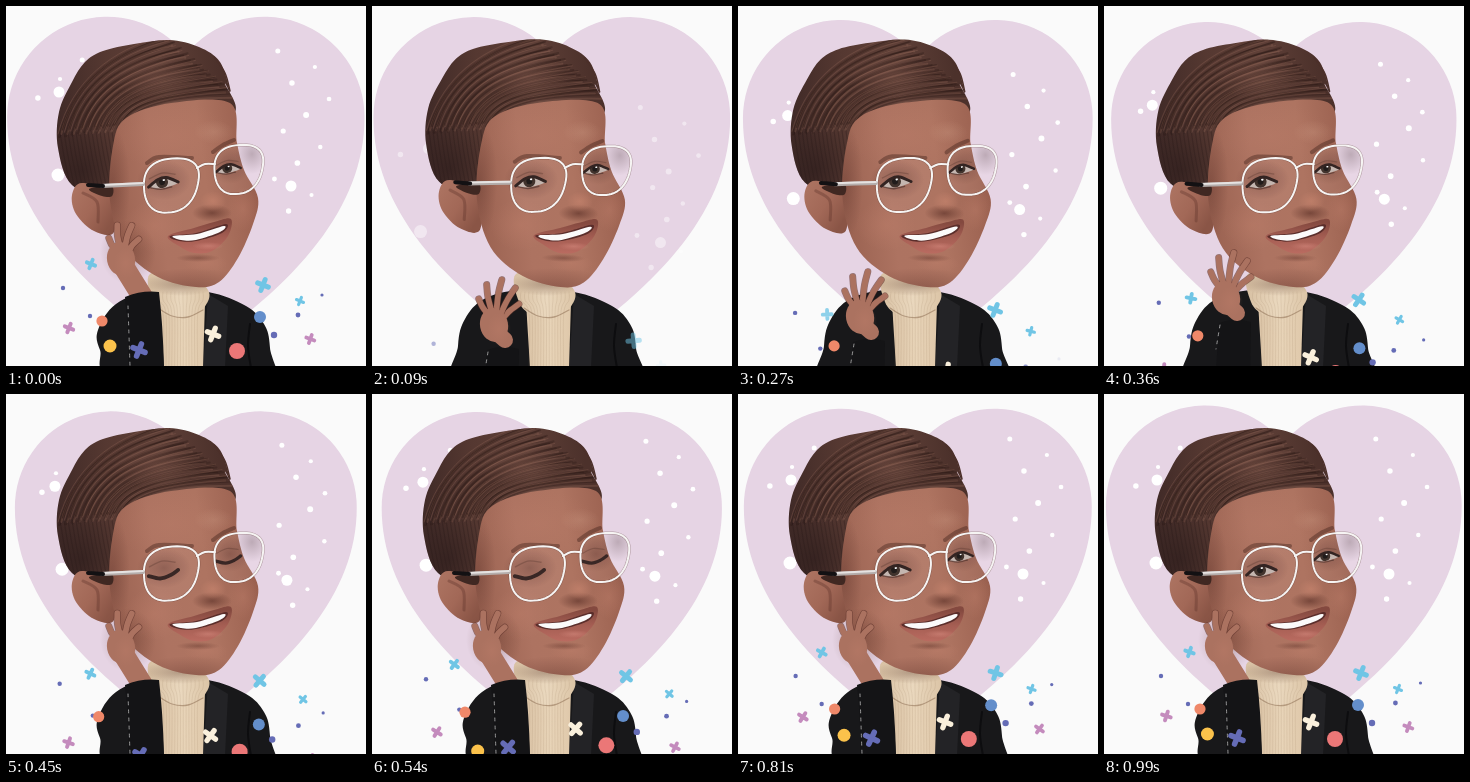
These frames come from a looping animation (360x360 px, 1080 ms). An HTML page with a canvas:

```html
<!DOCTYPE html>
<html lang="en">
<head>
<meta charset="utf-8">
<title>Smiling avatar with heart</title>
<style>
html, body { margin: 0; width: 100%; height: 100%; overflow: hidden; background: #fafafa; }
canvas { display: block; width: 100vw; height: 100vh; }
</style>
</head>
<body>
<canvas id="stage"></canvas>
<script>
const canvas = document.getElementById('stage');
const ctx = canvas.getContext('2d');
const SIZE = 360, STEP = 90, STEPS = 12, TAU = Math.PI * 2;
const ratio = window.devicePixelRatio || 1;
canvas.width = canvas.height = SIZE * ratio;

// Smooth path through "x y x y ..." points.
function curve(text, closed = true) {
  const n = text.split(' ').map(Number), p = [];
  for (let i = 0; i < n.length; i += 2) p.push([n[i], n[i + 1]]);
  const at = i => closed ? p[(i + p.length) % p.length] : p[Math.max(0, Math.min(p.length - 1, i))];
  const path = new Path2D();
  path.moveTo(...p[0]);
  for (let i = 0; i < p.length - !closed; i++) {
    const [a, b, c, d] = [at(i - 1), at(i), at(i + 1), at(i + 2)];
    path.bezierCurveTo(b[0] + (c[0] - a[0]) / 6, b[1] + (c[1] - a[1]) / 6,
      c[0] - (d[0] - b[0]) / 6, c[1] - (d[1] - b[1]) / 6, c[0], c[1]);
  }
  if (closed) path.closePath();
  return path;
}
const line = text => curve(text, false);

function oval(x, y, rx, ry, turn = 0) {
  const path = new Path2D();
  path.ellipse(x, y, rx, ry, turn, 0, TAU);
  return path;
}
function fill(path, color) { ctx.fillStyle = color; ctx.fill(path); }
function stroke(path, color, width) {
  ctx.strokeStyle = color; ctx.lineWidth = width; ctx.stroke(path);
}
const disc = (x, y, r, color) => fill(oval(x, y, r, r), color);

function linear(x0, y0, x1, y1, ...colors) {
  const g = ctx.createLinearGradient(x0, y0, x1, y1);
  colors.forEach((c, i) => g.addColorStop(i / (colors.length - 1), c));
  return g;
}
// Soft elliptical tint.
function glow(x, y, rx, ry, rgb, alpha) {
  ctx.save();
  ctx.translate(x, y); ctx.scale(rx, ry);
  const g = ctx.createRadialGradient(0, 0, 0, 0, 0, 1);
  g.addColorStop(0, `rgba(${rgb},${alpha})`);
  g.addColorStop(1, `rgba(${rgb},0)`);
  disc(0, 0, 1, g);
  ctx.restore();
}
function clipped(path, draw) {
  ctx.save(); ctx.clip(path); draw(); ctx.restore();
}

// Squarish lens that narrows downwards.
function lens(cx, cy, rx, ry, lean) {
  const path = new Path2D(), soft = v => Math.sign(v) * Math.abs(v) ** .82;
  for (let a = 0; a < TAU; a += .1) {
    const x = soft(Math.cos(a)), y = soft(Math.sin(a));
    path.lineTo(cx + rx * x * (1 - .12 * y) - lean * y, cy + ry * y - lean * x);
  }
  path.closePath();
  return path;
}

const heart = new Path2D('M179.5 49A100 100 0 0 0 1 112C1 200 67 278 179.5 352C292 278 358 200 358 112A100 100 0 0 0 179.5 49Z');
const hair = curve('104 191 66 179 52 142 53 106 66 76 79 56 97 45 128 38 163 34 193 41 214 56 224 86 219 78 227 108 160 114 108 160');
const face = curve('224 97 231 137 238 164 252 192 247 218 232 252 213 276 190 281 152 271 119 243 104 195 107 140 120 112 165 97');
const lenses = [lens(165, 179.5, 27, 27, 2), lens(232.5, 163.5, 24, 24.5, 1.5)];

const WHITE = '#fff', BLUE = '#70c5e5', INDIGO = '#656cb6', PINK = '#c48bbd';
const SKIN = '#ab7260', CREASE = 'rgba(88,47,40,.6)', DARK = '#18181a';

const GOLDEN = .618;
const dots = [[53, 86, 5.5], [52, 169, 6.5], [285, 180, 5.5]];
function scatter(x, y, width, gap, count, phase) {
  for (let i = 0; i < count; i++)
    dots.push([x + width * ((i * GOLDEN + phase) % 1), y + gap * i, 2 + (i * GOLDEN + .5) % 1]);
}
scatter(24, 54, 58, 19, 4, .9);
scatter(267, 45, 60, 16, 11, .08);

// x, y, radius, colour, in order of appearance
const crosses = [
  [257, 279, 8, BLUE], [294, 295, 5.2, BLUE], [207, 328, 8.5, '#faf0dc'], [133, 344, 9, INDIGO],
  [85, 258, 6.2, BLUE], [63, 322, 6.3, PINK], [304, 333, 6, PINK]
];
const discs = [[96, 315, 5.6, '#ef8869'], [231, 345, 8, '#eb7777'], [254, 311, 6, '#638ecb'], [104, 340, 6.5, '#fbc24b']];
const specks = [];
for (let i = 0; i < 5; i++)
  specks.push(i < 2 ? [57 + 27 * i, 282 + 28 * i, 2.2, INDIGO] : [220 + 24 * i, 369 - 20 * i, 4.8 - i * .8, INDIGO]);

const lift = (u, height) => height * Math.max(0, 1 - u / 8) ** 2.6;
const sway = u => u >= 9 ? 0 : -Math.cos(.62 * u) * Math.sqrt(1 - u / 9);
const side = i => i % 2 ? 5 : -5;

function drawDots(k) {
  ctx.globalAlpha = Math.min(1, k * .45);
  dots.forEach(([x, y, r], i) => disc(x + side(i) * 1.4 * sway(k + .6), y + lift(k, 80), r, WHITE));
  ctx.globalAlpha = 1;
}

function drawConfetti(k) {
  const spread = (list, draw) => list.forEach(([x, y, r, color], i) => {
    const u = k - .5 - 3 * i / list.length;
    if (u <= 0) return;
    ctx.save();
    ctx.globalAlpha = Math.min(1, u);
    ctx.translate(x + side(i) * sway(u), y + lift(u, 66));
    draw(r, color, u);
    ctx.restore();
  });
  const spot = (r, color) => disc(0, 0, r, color);
  spread(specks, spot);
  spread(discs, spot);
  spread(crosses, (r, color, u) => {
    const arm = r * .72;
    ctx.rotate(.38 + sway(u) * .5);
    stroke(new Path2D(`M${-arm} 0H${arm}M0 ${-arm}V${arm}`), color, r * .62);
  });
}

function drawBody(up) {
  const arm = up ? '112 375 94 344 92 324 110 298' : '87 400 86 340 93 313 112 293';
  fill(curve(`${arm} 148 284 202 286 240 300 258 318 264 342 264 400`), DARK);
  fill(new Path2D('M202 288L222 300L219 362H197Z'), '#232326');
  stroke(line('244 318 242 340 245 362'), '#0d0d0f', 2);
  fill(new Path2D('M154 296L158 362H197L199 296Z'), linear(157, 0, 199, 0, '#dcc5a8', '#e8d4b8', '#dfc8aa'));
  const collar = curve('144 268 147 296 160 309 178 311 195 305 203 286 180 266');
  fill(collar, linear(145, 0, 203, 0, '#d9c2a5', '#ead8be', '#dcc5a7'));
  clipped(collar, () => glow(175, 278, 38, 12, '90,55,40', .4));
  for (let x = 149; x < 201; x += 4) {
    const foot = 178 + (x - 178) * .72;
    stroke(line(`${x} 286 ${x} 294 ${foot} 308 ${foot} 362`), 'rgba(150,118,90,.14)', 1);
  }
  stroke(line('152 302 166 310 182 311 197 304'), 'rgba(125,92,66,.45)', 1.3);
}

function drawHair() {
  fill(hair, linear(50, 100, 215, 80, '#402a27', '#553831', '#5f4038', '#4c312b'));
  clipped(hair, () => {
    for (let i = 0; i < 64; i++) {
      const f = i / 63, j = Math.sin(i * 7.3) * 4;
      const lock = new Path2D();
      lock.moveTo(52 + 66 * f, 128 - 8 * f + j);
      lock.bezierCurveTo(66 + 62 * f, 74 + 26 * f + j, 106 + 52 * f, 44 + 48 * f, 156 + 70 * f, 30 + 58 * f + j);
      stroke(lock, i % 3 ? 'rgba(38,21,19,.3)' : 'rgba(148,102,87,.32)', 1 + i % 2);
    }
    for (let x = 54; x < 108; x += 4)
      stroke(line(`${x} 126 ${x + 4} 150 ${x + 11} 184`), 'rgba(30,18,18,.25)', 1.2);
    glow(76, 165, 42, 46, '44,28,27', .6);
    glow(150, 72, 45, 22, '150,104,90', .3);
  });
  stroke(line('208 51 219 67 224 85'), '#4c302a', 1.5);
}

function drawEye(x, y, size, closed) {
  ctx.save();
  ctx.translate(x, y); ctx.rotate(-.14); ctx.scale(size, size);
  if (closed) {
    stroke(line('-15 4 -4 8 7 6 15 2'), '#2a1815', 3.8);
  } else {
    const eye = curve('-13 3 -5 -3 4 -4 15 2 7 5 -4 6');
    fill(eye, '#bfb1ab');
    clipped(eye, () => {
      disc(-1, 0, 6, '#33251e');
      disc(-1, 0, 3, '#100c0b');
      disc(1, -2, 1.2, WHITE);
    });
    stroke(line('-15 3 -5 -3 4 -4 15 2'), '#231412', 3);
    stroke(line('-13 4 -3 7 8 6'), 'rgba(55,28,23,.6)', 1.4);
  }
  stroke(line('-13 -5 0 -9 13 -6'), 'rgba(75,40,32,.35)', 1.3);
  ctx.restore();
}

function drawFace(closed) {
  fill(face, linear(104, 200, 250, 180, '#9a6251', '#ad7361', '#ae7461', '#9a604f'));
  clipped(face, () => {
    const light = '192,128,108', shade = '92,50,42';
    glow(165, 130, 60, 34, light, .3);
    glow(208, 126, 20, 12, '205,155,132', .3);
    glow(148, 220, 30, 26, light, .4);
    glow(237, 203, 16, 22, light, .4);
    glow(185, 284, 66, 22, shade, .4);
    glow(106, 180, 18, 60, shade, .4);
    glow(200, 257, 22, 9, light, .4);
    glow(158, 174, 27, 20, shade, .45);
    glow(224, 160, 20, 18, shade, .45);
  });
  const brow = 'rgba(65,34,27,.42)';
  stroke(line('141 157 153 151 186 152'), brow, 4);
  stroke(line('207 146 217 139 228 134'), brow, 4);

  // Nose
  glow(206, 207, 20, 9, '84,42,34', .6);
  glow(207, 195, 13, 10, '196,130,108', .7);

  // Mouth
  fill(curve('162 230 188 222 208 216 225 213 222 230 206 245 188 247 173 240'),
    linear(0, 216, 0, 247, '#84493f', '#a55e53', '#b96b60'));
  fill(curve('164 230 190 227 220 218 216 227 190 235 173 235'), '#5b2e2b');
  fill(curve('167 230 191 228 218 220 214 226 190 234 175 234'), '#fbfafa');
  glow(202, 240, 16, 4, '226,150,138', .4);
  glow(192, 252, 22, 4, '85,44,36', .4);

  drawEye(157, 176, 1, closed);
  drawEye(222, 162, .84, closed);
}

function drawGlasses() {
  const rims = [...lenses, line('191 162 199 158 209 158')];
  lenses.forEach(l => fill(l, 'rgba(255,240,235,.07)'));
  clipped(lenses[1], () => glow(246, 148, 17, 20, '90,70,75', .3));
  rims.forEach(r => stroke(r, 'rgba(75,42,36,.35)', 3));
  rims.forEach(r => stroke(r, '#f6f4f3', 2));
  stroke(line('96 180 137 178'), '#b4adab', 4);
  stroke(line('96 179 137 177'), '#e6e3e2', 2);
  stroke(line('82 179 97 180'), '#131113', 4);
}

function drawHead(tilt, closed) {
  ctx.save();
  ctx.translate(190, 225); ctx.rotate(tilt); ctx.translate(-190, -225);
  drawHair();
  fill(curve('106 188 76 177 66 189 70 208 88 225 108 226'), linear(66, 190, 106, 215, '#ab7260', '#a26857', '#8a5546'));
  stroke(line('77 187 91 196 92 216'), 'rgba(91,49,39,.35)', 3);
  drawFace(closed);
  fill(curve('83 183 105 180 106 190 96 190'), '#402822');
  drawGlasses();
  ctx.restore();
}

// Palm with fingers fanned from its centre.
function drawHand(x, y, wrist, width, count, spread, reach) {
  stroke(line(`${x + 3} ${y + 8} ${wrist}`), SKIN, width);
  for (let i = count - 1; i >= 0; i--) {
    const a = -2.1 + spread * i, len = reach * (.6 + .4 * Math.sin(Math.PI * (i + .2) / (count - .4)));
    const cos = Math.cos(a), sin = Math.sin(a);
    const finger = line(`${x + cos * 14} ${y + sin * 14} ${x + cos * len * .7 - 1} ${y + sin * len * .7} ${x + cos * len} ${y + sin * len}`);
    stroke(finger, CREASE, 7);
    stroke(finger, SKIN, 5.8);
  }
  fill(oval(x, y, 14, 17, -.2), SKIN);
  glow(x + 5, y + 4, 12, 16, '190,126,106', .35);
}

function drawSleeve(shape, stitch) {
  fill(new Path2D(shape), '#141416');
  ctx.setLineDash([3, 5]);
  stroke(line(stitch), '#b9b9b9', .8);
  ctx.setLineDash([]);
}

function drawArm(up, dy) {
  if (up) {
    glow(122, 246, 28, 32, '75,37,29', .3);
    drawHand(115, 253, '136 290', 21, 4, .42, 36);
    drawSleeve('M119 291Q136 284 153 286Q157 320 158 362H122Q123 325 119 291Z', '122 300 124 360');
  } else {
    ctx.save();
    ctx.translate(0, dy);
    drawSleeve('M115 336Q130 330 147 335L146 400H111Z', '116 338 112 362');
    drawHand(122, 311, '133 326', 16, 5, .35, 46);
    ctx.restore();
  }
}

function draw(k) {
  ctx.setTransform(ratio, 0, 0, ratio, 0, 0);
  ctx.lineCap = ctx.lineJoin = 'round';
  ctx.fillStyle = '#fafafa';
  ctx.fillRect(0, 0, SIZE, SIZE);

  const scale = (174.5 + 4.3 * Math.cos(TAU * (k - .2) / STEPS)) / 178.6;
  ctx.save();
  ctx.translate(180, 162); ctx.scale(scale, scale); ctx.translate(-179.7, -162);
  fill(heart, '#e6d4e4');
  ctx.restore();

  // The hand leaves the cheek, the head straightens, then both return.
  const rise = k || STEPS, up = k < 1 || k > 4, q = k - 1;
  drawDots(rise);
  drawBody(up);
  drawHead(up ? 0 : .026 * (1 - (q / 4) ** 2), k >= 5 && k <= 7);
  drawArm(up, 8 - q ** 3);
  drawConfetti(rise);
}

let last = -1;
function tick() {
  const k = Math.floor(performance.now() / STEP) % STEPS;
  if (k !== last) draw(last = k);
  requestAnimationFrame(tick);
}
tick();
</script>
</body>
</html>
```
